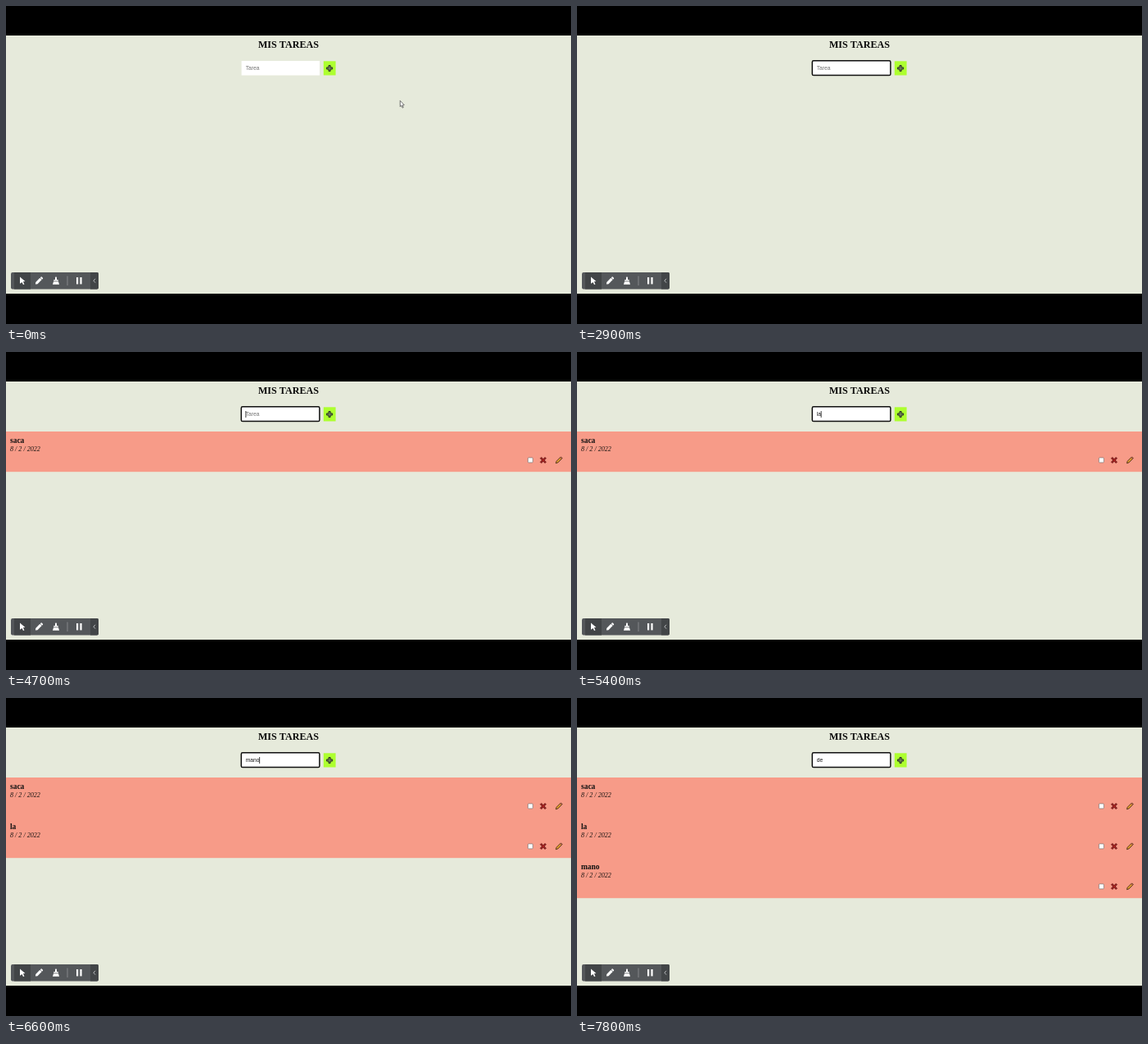
Recreate the animation shown at these times as an HTML page with a canvas. Size 690 by 388 pixels, loop 8 s.

```html
<!DOCTYPE html>
<html lang="es">
<head>
<meta charset="utf-8">
<title>Mis tareas</title>
<style>
html, body { margin: 0; width: 100%; height: 100%; overflow: hidden; background: #000; }
canvas { display: block; width: 690px; height: 388px; }
</style>
</head>
<body>
<canvas id="stage" width="690" height="388"></canvas>
<script>
const ctx = document.getElementById('stage').getContext('2d');
const LOOP = 8000;
const SANS = '6.73px "Liberation Sans", Arial, sans-serif';
const SERIF = '"Liberation Serif", "Times New Roman", serif';
const TASKS = ['saca', 'la', 'mano'];

// time, typed text, caret visible, tasks in the list, input focused
const STEPS = [
  [0, '', false, 0, false],
  [1300, '', true, 0, true],
  [1900, '', false, 0, true],
  [2400, '', true, 0, true],
  [2900, '', false, 0, true],
  [3200, 's', true, 0, true],
  [3300, 'sa', true, 0, true],
  [3600, 'sac', true, 0, true],
  [3700, 'saca', true, 0, true],
  [4200, 'saca', false, 0, true],
  [4700, '', true, 1, true],
  [5300, 'l', true, 1, true],
  [5400, 'la', true, 1, true],
  [5800, '', true, 2, true],
  [6000, '', false, 2, true],
  [6200, 'm', true, 2, true],
  [6300, 'ma', true, 2, true],
  [6500, 'man', true, 2, true],
  [6600, 'mano', true, 2, true],
  [6900, '', true, 3, true],
  [7100, 'd', true, 3, true],
  [7300, 'de', true, 3, true],
  [7800, 'de', false, 3, true]
];

function rect(x, y, w, h, color) {
  ctx.fillStyle = color;
  ctx.fillRect(x, y, w, h);
}

function box(x, y, w, h, r, fill, stroke, width = 1) {
  ctx.beginPath();
  ctx.roundRect(x, y, w, h, r);
  paint(fill, stroke, width);
}

function poly(x, y, points, fill, stroke, width = 1) {
  ctx.beginPath();
  for (let i = 0; i < points.length; i += 2) ctx.lineTo(x + points[i], y + points[i + 1]);
  ctx.closePath();
  paint(fill, stroke, width);
}

function paint(fill, stroke, width) {
  if (fill) {
    ctx.fillStyle = fill;
    ctx.fill();
  }
  if (stroke) {
    ctx.strokeStyle = stroke;
    ctx.lineWidth = width;
    ctx.stroke();
  }
}

function line(x1, y1, x2, y2, color, width) {
  ctx.beginPath();
  ctx.moveTo(x1, y1);
  ctx.lineTo(x2, y2);
  paint(null, color, width);
}

function text(str, x, y, font, color, align = 'left') {
  ctx.font = font;
  ctx.fillStyle = color;
  ctx.textAlign = align;
  ctx.fillText(str, x, y);
}

function rotated(x, y, angle, draw) {
  ctx.save();
  ctx.translate(x, y);
  ctx.rotate(angle);
  draw();
  ctx.restore();
}

function cross(size, arm, fill, stroke) {
  const s = size, a = arm;
  poly(0, 0, [-a, -s, a, -s, a, -a, s, -a, s, a, a, a, a, s, -a, s, -a, a, -s, a, -s, -a, -a, -a],
    fill, stroke, 0.9);
}

function drawForm(typed, caret, focused) {
  text('MIS TAREAS', 345, 51.2, 'bold 12.12px ' + SERIF, '#0b0b0b', 'center');
  if (focused) box(287.3, 66.8, 95.6, 17.7, 1.6, '#fff', '#101010', 1.5);
  else rect(287.6, 67, 95.4, 17.6, '#fff');

  if (typed) text(typed, 292.7, 78.2, SANS, '#1c1c1c');
  else text('Tarea', 292.7, 78.2, SANS, '#757575');
  if (caret) {
    ctx.font = SANS;
    rect(292.5 + ctx.measureText(typed).width, 72, 0.8, 8, '#111');
  }

  rect(387.8, 67.3, 14.8, 17.2, '#adff2f');
  rotated(395.1, 76, 0, () => cross(3.5, 1.1, '#6f8358', '#22271f'));
}

function drawTask(name, y) {
  rect(0, y, 690, 49.2, '#f79b88');
  text(name, 5, y + 13.8, 'bold 9.45px ' + SERIF, '#111');
  text('8 / 2 / 2022', 5, y + 23.6, 'italic 8.08px ' + SERIF, '#1c1614');
  box(637.4, y + 31.9, 6, 6, 1, '#fff', '#7b7270', 0.7);
  rotated(656, y + 35, Math.PI / 4, () => cross(4, 0.9, '#b3201f', '#5a1414'));
  rotated(675.2, y + 35, -Math.PI / 4, () => {
    poly(0, 0, [-5.2, 0, -3, -1.2, 4.6, -1.2, 4.6, 1.2, -3, 1.2], '#e8a130', '#3c2414', 0.8);
    rect(3, -0.9, 1.4, 1.8, '#a8574e');
  });
}

function drawToolbar() {
  box(6, 325, 107, 20.5, 2, '#54575a');
  rect(10, 325, 20, 20.5, '#424547');
  box(103, 325, 10, 20.5, [0, 2, 2, 0], '#424547');
  poly(17, 330.6, [0, 0, 6.4, 5.4, 3.9, 5.7, 5.4, 8.8, 4, 9.4, 2.5, 6.3, 0, 8.2], '#fff');

  rotated(40.2, 335.2, -Math.PI / 4, () => {
    poly(0, 0, [-6, 0, -4, -1.6, 3.2, -1.6, 3.2, 1.6, -4, 1.6], '#fff');
    box(3.8, -1.6, 2, 3.2, 0.7, '#fff');
  });

  box(60, 330.6, 2, 4, 0.8, '#fff');
  poly(61, 334, [-2.6, 0, 2.6, 0, 2.9, 1.6, -2.9, 1.6], '#fff');
  poly(61, 336.2, [-3, 0, 3, 0, 4, 3.5, -4, 3.5], '#fff');

  line(75, 329.5, 75, 341, '#85888a', 1);
  rect(86, 331, 2.2, 8.4, '#fff');
  rect(90.4, 331, 2.2, 8.4, '#fff');
  ctx.beginPath();
  ctx.moveTo(109, 332.8);
  ctx.lineTo(106.9, 335.2);
  ctx.lineTo(109, 337.6);
  paint(null, '#d5d6d7', 0.8);
}

function drawPointer(t) {
  const p = Math.floor(t / 100) / 7;
  if (p >= 1) return;
  const k = p * p * (3 - 2 * p);
  poly(481.3 - 109 * k, 115.5 - 33 * k,
    [0, 0, 0, 7.3, 1.6, 5.9, 2.8, 8.7, 4, 8.2, 2.8, 5.5, 5, 5.3], '#fff', '#3a3a3a', 0.7);
}

function draw(t) {
  const [, typed, caret, count, focused] = STEPS.findLast(s => s[0] <= t);
  rect(0, 0, 690, 388, '#000');
  rect(0, 36, 690, 315, '#e6eadb');
  drawForm(typed, caret, focused);
  TASKS.slice(0, count).forEach((name, i) => drawTask(name, 97 + 49 * i));
  drawToolbar();
  drawPointer(t);
}

const start = performance.now();
function tick() {
  draw((performance.now() - start) % LOOP);
  requestAnimationFrame(tick);
}
tick();
</script>
</body>
</html>
```
